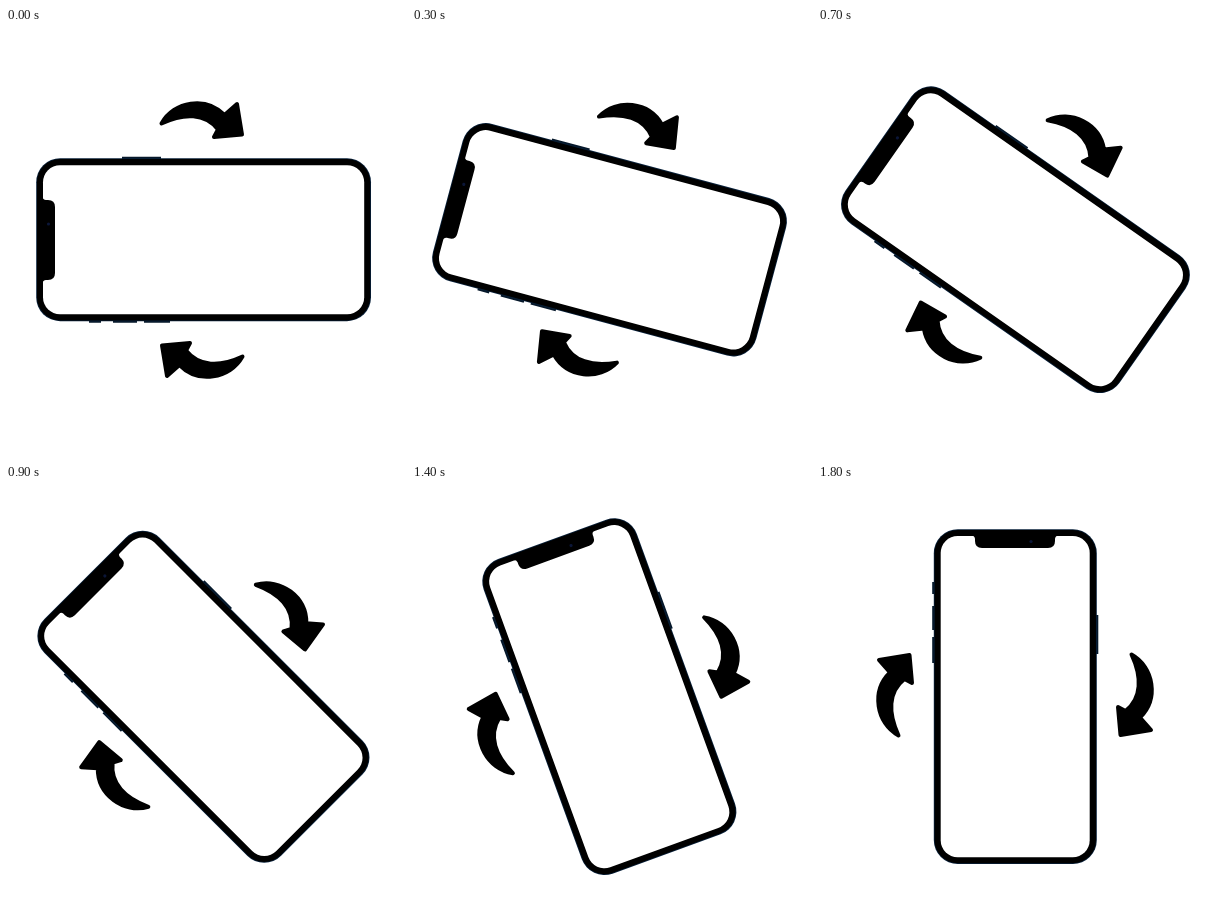
An HTML page that plays this animation: 400x429 px, repeating every 2.8 s.

```html
<!DOCTYPE html>
<html lang="en">
<head>
<meta charset="utf-8">
<title>Rotate phone</title>
<style>
  html, body { margin: 0; height: 100%; overflow: hidden; background: #fff; }
  svg { display: block; width: 100%; height: 100%; }
</style>
</head>
<body>
<svg viewBox="0 0 400 429">
  <g id="scene">
    <!-- side buttons -->
    <path d="M116 130.2H155M83 293.3H95M107 293.3H131M138 293.3H164" stroke="#06182a" stroke-width="3"/>
    <!-- body and screen -->
    <rect x="30.2" y="130.2" width="334.8" height="163" rx="24" fill="#08203a"/>
    <rect x="31" y="131" width="333.2" height="161.4" rx="23.2"/>
    <rect x="37" y="137.3" width="321.2" height="149" rx="17" fill="#fff"/>
    <!-- notch -->
    <path d="M36 168Q37 172 40 172H42Q49 172 49 179V245Q49 252 42 252H40Q37 252 36 256Z"/>
    <circle cx="42.5" cy="196" r="1.6" fill="#0b1638"/>
    <path id="arrow" d="M155.5 95.5C168 73 200 68 218.5 87L231 76L236 106.5L208 109L212 101.5C199 85 178 85 155.5 95.5Z"
      stroke="#000" stroke-width="4" stroke-linejoin="round"/>
    <use href="#arrow" transform="rotate(180 196 212)"/>
  </g>
</svg>
<script>
  const LOOP = 2800, STEP = 100, TURN = 5, LAST = 18;
  const scene = document.getElementById('scene');
  const start = performance.now();

  function draw(now) {
    const t = Math.max(0, now - start) % LOOP;
    const angle = TURN * Math.min(LAST, Math.floor(t / STEP));
    scene.setAttribute('transform', `rotate(${angle} 197.5 211.5)`);
    requestAnimationFrame(draw);
  }
  draw(start);
</script>
</body>
</html>
```
